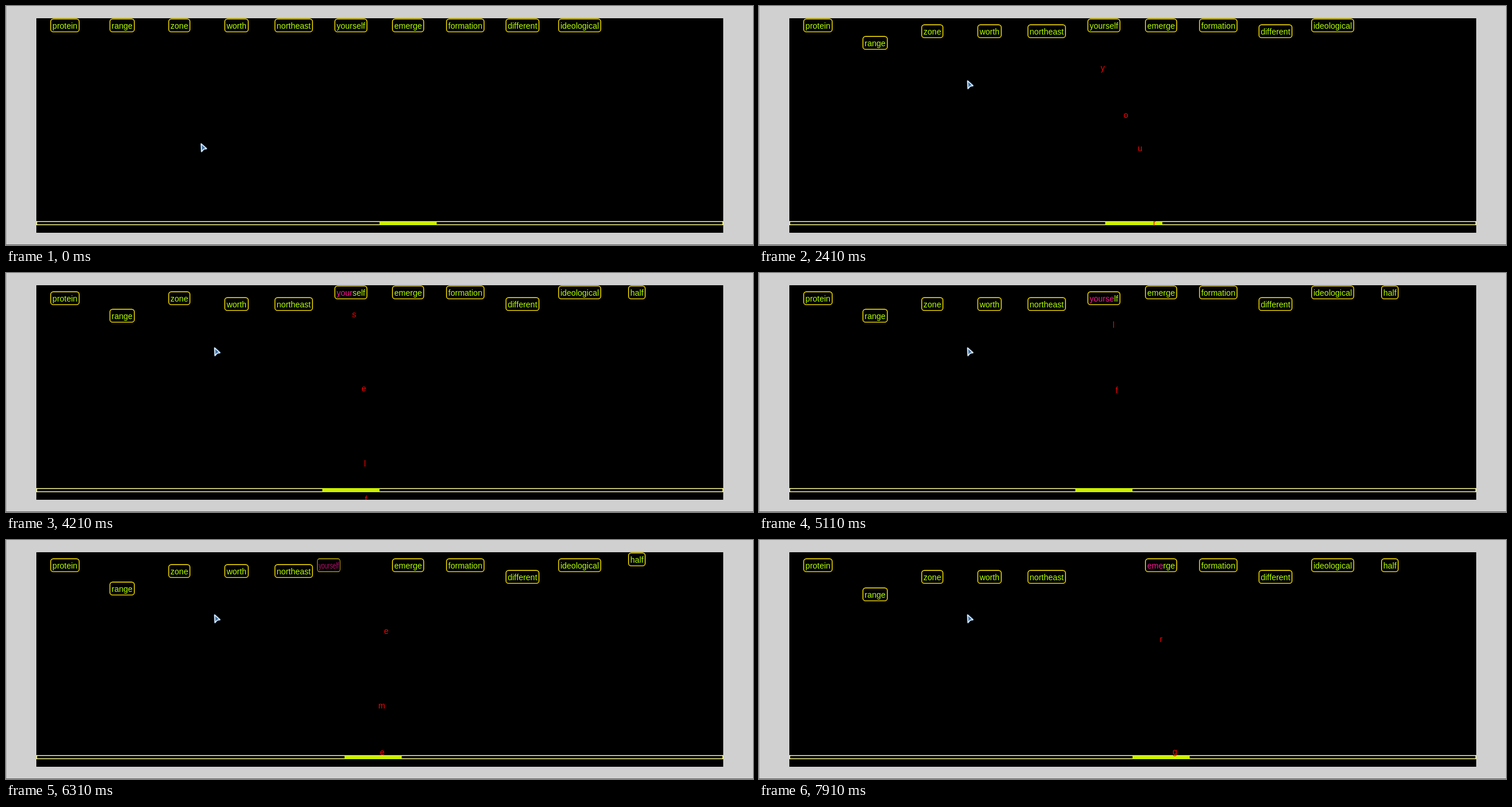
Animation of 1280 by 410 pixels, one loop 8000 ms. Source, as an HTML page with a canvas:

```html
<!DOCTYPE html>
<html lang="en">
<head>
<meta charset="utf-8">
<title>Falling words</title>
<style>
html, body { margin: 0; width: 100%; height: 100%; overflow: hidden; background: #d0d0d0; }
canvas { display: block; }
</style>
</head>
<body>
<canvas id="stage" width="1280" height="410"></canvas>
<script>
const ctx = document.getElementById('stage').getContext('2d');
const LOOP = 8000;
const FIELD = { x: 52, y: 21, w: 1177, h: 368 };
const COLUMN = 98, FIRST = 101;
const LIME = '#b4ff00', GOLD = '#ffe600', PINK = '#ff1493', RED = '#ff0000';
const FONT = '14px "Liberation Sans", Arial, sans-serif';
const PAD = 3.5;

// Each word drops one step on the listed beats; a beat lasts 900 ms.
const words = [
  { text: 'protein', drops: [5] },
  { text: 'range', drops: [1, 2, 3, 5, 7, 9] },
  { text: 'zone', drops: [2, 6, 9] },
  { text: 'worth', drops: [2, 5, 8] },
  { text: 'northeast', drops: [2, 5, 8] },
  { text: 'yourself', drops: [6], exit: 6060, typed: [1100, 1413, 1605, 2156, 2694, 3250, 3715, 4160] },
  { text: 'emerge', drops: [7], typed: [5206, 5645, 6000, 6853, 7594] },
  { text: 'formation', drops: [7] },
  { text: 'different', drops: [1, 4, 7] },
  { text: 'ideological', drops: [7] },
  { text: 'half', drops: [9], enter: 4 }
];
const FLIGHT = 1755, LAUNCH_Y = 393.6, LAND_Y = 60.6;

const clamp = v => Math.min(1, Math.max(0, v));
const mix = (a, b, p) => a + (b - a) * p;
const swing = p => 0.5 - Math.cos(Math.PI * clamp(p)) / 2;
const beat = t => Math.floor((t - 300) / 900) + 1;
const width = s => ctx.measureText(s).width;

function barLeft(t) {
  return 640 - 98 * swing((t - 1060) / 2780) + 98 * swing((t - 5115) / 2790);
}

function drawFrame() {
  ctx.fillStyle = '#d0d0d0';
  ctx.fillRect(0, 0, 1280, 410);
  ctx.fillStyle = '#a8a8a8';
  ctx.fillRect(0, 0, 1, 410);
  ctx.fillStyle = '#606060';
  ctx.fillRect(0, 409, 1280, 1);
  ctx.fillStyle = '#000';
  ctx.fillRect(FIELD.x, FIELD.y, FIELD.w, FIELD.h);
}

function drawBar(t) {
  ctx.strokeStyle = '#ffff99';
  ctx.lineWidth = 1.4;
  ctx.strokeRect(52.7, 369.7, 1175.6, 5.6);
  ctx.fillStyle = '#ccf000';
  ctx.fillRect(barLeft(t), 369, 98, 7);
}

function drawWord(word, i, t) {
  const now = beat(t);
  if (word.enter && now < word.enter) return;
  const out = word.exit ? clamp((t - word.exit) / 1000) : 0;
  if (out === 1) return;

  const w = width(word.text);
  const y = 10 * word.drops.filter(d => d <= now).length;
  const turn = Math.PI * out;
  ctx.save();
  ctx.translate(FIRST + COLUMN * i - 215 * out * Math.sin(turn), y);
  ctx.scale(Math.cos(turn) || 0.001, 1);
  ctx.globalAlpha = 1 - out;

  ctx.strokeStyle = GOLD;
  ctx.lineWidth = 1.4;
  ctx.beginPath();
  ctx.roundRect(-w / 2 - 3, 22.2, w + 6, 22.2, 4.5);
  ctx.stroke();

  const landed = (word.typed || []).filter(s => t >= s + FLIGHT).length;
  const done = word.text.slice(0, landed);
  ctx.fillStyle = PINK;
  ctx.fillText(done, -w / 2, 39);
  ctx.fillStyle = LIME;
  ctx.fillText(word.text.slice(landed), -w / 2 + width(done), 39);
  ctx.restore();
}

function drawLetters(word, i, t) {
  const left = FIRST + COLUMN * i - width(word.text) / 2 - PAD;
  ctx.fillStyle = RED;
  word.typed.forEach((start, n) => {
    const p = (t - start) / FLIGHT;
    if (p < 0 || p >= 1) return;
    const e = swing(p);
    const goal = left + width(word.text.slice(0, n));
    ctx.fillText(word.text[n], mix(barLeft(start) + 73, goal, e), mix(LAUNCH_Y, LAND_Y, e));
  });
}

function drawCursor(t) {
  const p = clamp(t / 480);
  ctx.save();
  ctx.translate(mix(334.5, 357.5, p), mix(236.5, 128.5, p));
  const arrow = new Path2D('M0 0L9 8.2L4.4 9L0.6 13.2Z');
  ctx.lineJoin = 'round';
  ctx.strokeStyle = '#24486c';
  ctx.lineWidth = 3;
  ctx.stroke(arrow);
  ctx.fillStyle = '#3f6f9f';
  ctx.fill(arrow);
  ctx.strokeStyle = '#e6f3ff';
  ctx.lineWidth = 1.6;
  ctx.stroke(arrow);
  ctx.restore();
}

// The picture advances in tenths of a second.
function quantise(t) {
  if (t >= 480 && t < 890) return 480;
  return t < 480 ? Math.floor(t / 100) * 100 : Math.floor((t - 10) / 100) * 100 + 10;
}

function draw(t) {
  drawFrame();
  ctx.save();
  ctx.beginPath();
  ctx.rect(FIELD.x, FIELD.y, FIELD.w, FIELD.h);
  ctx.clip();
  ctx.font = FONT;
  ctx.fontKerning = 'none';
  drawBar(t);
  words.forEach((word, i) => drawWord(word, i, t));
  words.forEach((word, i) => word.typed && drawLetters(word, i, t));
  ctx.restore();
  drawCursor(t);
}

const begin = performance.now();
function tick() {
  draw(quantise((performance.now() - begin) % LOOP));
  requestAnimationFrame(tick);
}
tick();
</script>
</body>
</html>
```
